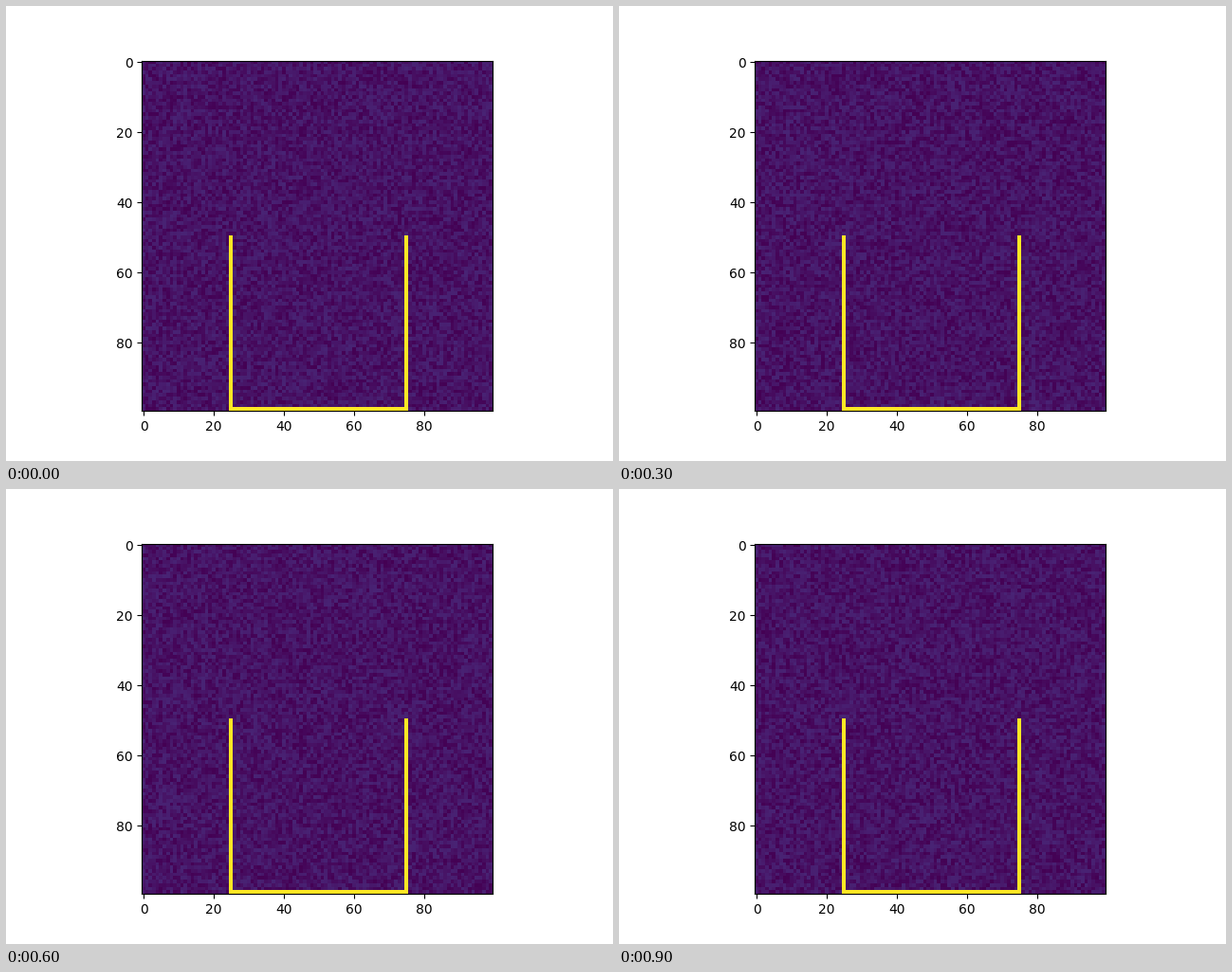
These frames come from a looping animation (640 by 480 pixels, 1000 ms). A matplotlib script:

```python
import numpy as np
import matplotlib.pyplot as plt
from matplotlib.animation import FuncAnimation

SIZE = 100
FRAMES = 10
INTERVAL = 100
NOISE = 0.1


def cup_field(frame):
    """Low random noise with a U-shaped container of value 1."""
    field = NOISE * np.random.default_rng(frame).random((SIZE, SIZE))
    left, right, top = SIZE // 4, 3 * SIZE // 4, SIZE // 2
    field[top:, [left, right]] = 1
    field[-1, left:right + 1] = 1
    return field


fig, ax = plt.subplots(figsize=(6.4, 4.8), dpi=100)
image = ax.imshow(cup_field(0), cmap="viridis", vmin=0, vmax=1,
                  interpolation="nearest")


def update(frame):
    image.set_data(cup_field(frame))
    return [image]


anim = FuncAnimation(fig, update, frames=FRAMES, interval=INTERVAL,
                     repeat=True, repeat_delay=0)
plt.show()
```
